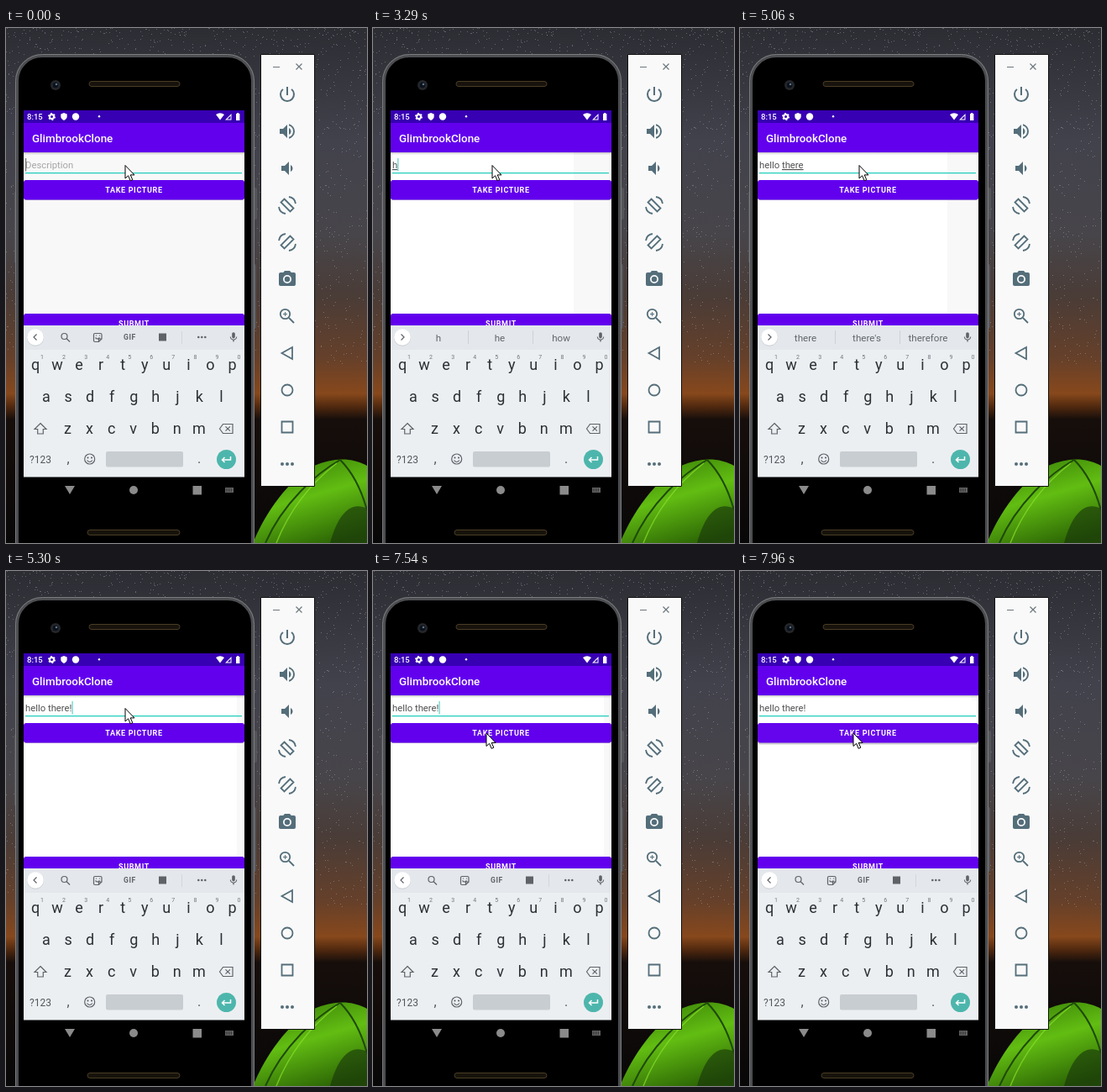
Recreate the animation shown at these times as an HTML page. Size 430 by 613 pixels, loop 8000 ms.

```html
<!DOCTYPE html>
<html lang="en">
<head>
<meta charset="utf-8">
<title>Emulator typing demo</title>
<style>
  html, body { margin: 0; width: 100%; height: 100%; overflow: hidden; background: #000; }
  svg { display: block; width: 430px; height: 613px; }
  text { font-family: Roboto, sans-serif; white-space: pre; }
  .mid { text-anchor: middle; }
  .line { fill: none; stroke: #5f6368; stroke-width: 1.2; }
  .tool { fill: #546e7a; }
  .tool .o { fill: none; stroke: #546e7a; stroke-width: 1.8; }
  .btn { font-size: 9px; font-weight: 700; letter-spacing: .65px; fill: #fff; text-anchor: middle; }
  .key { font-size: 18px; fill: #2b3034; text-anchor: middle; }
</style>
</head>
<body>
<svg viewBox="0 0 430 613">
  <defs>
    <linearGradient id="sky" x2="0" y2="1">
      <stop offset="0" stop-color="#2c2c33"/>
      <stop offset=".22" stop-color="#42424c"/>
      <stop offset=".4" stop-color="#47454a"/>
      <stop offset=".52" stop-color="#4a3c37"/>
      <stop offset=".64" stop-color="#65402a"/>
      <stop offset=".71" stop-color="#87481c"/>
      <stop offset=".735" stop-color="#51290f"/>
      <stop offset=".76" stop-color="#160e0b"/>
      <stop offset="1" stop-color="#080707"/>
    </linearGradient>
    <linearGradient id="tent" x1=".3" x2=".7" y2="1">
      <stop offset="0" stop-color="#3a8208"/>
      <stop offset=".45" stop-color="#62bd12"/>
      <stop offset="1" stop-color="#2c6505"/>
    </linearGradient>
    <linearGradient id="shade" x2="0" y2="1">
      <stop offset="0" stop-opacity=".22"/>
      <stop offset="1" stop-opacity="0"/>
    </linearGradient>
    <clipPath id="content"><path d="M21 148H284V354H21Z"/></clipPath>
  </defs>

  <!-- Backdrop -->
  <path fill="url(#sky)" d="M0 0H430V613H0Z"/>
  <path id="stars" stroke="#b9bbc6" stroke-opacity=".38" fill="none"/>
  <path fill="url(#tent)" d="M294 613C310 575 335 540 367 521C390 511 412 511 430 521V613Z"/>
  <path fill="#16330a" d="M430 572C410 562 395 580 386 613H430Z" opacity=".6"/>
  <path fill="none" stroke="#1e4a06" stroke-width="2" d="M398 514C370 530 330 565 309 613M398 514C414 530 424 552 430 574"/>
  <path fill="none" stroke="#8be22c" stroke-width="1.5" opacity=".7" d="M394 518C368 538 340 568 322 613"/>

  <!-- Phone -->
  <g fill="#55565a">
    <rect x="294" y="190" width="5" height="38" rx="2"/>
    <rect x="294" y="281" width="4" height="77" rx="2"/>
    <path d="M10 195h3v84h-3z"/>
  </g>
  <rect x="13" y="33" width="281" height="660" rx="30" stroke="#4c4d50" stroke-width="4"/>
  <rect x="11.5" y="31.5" width="284" height="660" rx="32" fill="none" stroke="#88898c" stroke-width=".8"/>
  <g fill="#17130c" stroke="#4a3d25">
    <rect x="99" y="63.500" width="108" height="6" rx="3"/>
    <rect x="97" y="597.500" width="110" height="6" rx="3"/>
  </g>
  <circle cx="59" cy="68" r="6" fill="#24262a"/>
  <circle cx="59" cy="68" r="3.200" fill="#0b111b"/>
  <circle cx="60" cy="67" r="1.300" fill="#5c7187"/>

  <!-- App content -->
  <path fill="#f8f8f8" d="M21 148H284V354H21Z"/>
  <path id="bright" fill="#fff"/>
  <path fill="#6200ee" d="M21 113H284V148H21Z"/>
  <path fill="#3700b3" d="M21 98H284V113H21Z"/>
  <path fill="url(#shade)" d="M21 148H284V151H21Z"/>
  <text x="31" y="136" font-size="13.400" font-weight="500" fill="#fff">GlimbrookClone</text>
  <g fill="#fff">
    <text x="25" y="109" font-size="9.500" font-weight="500">8:15</text>
    <circle cx="54.500" cy="105.500" r="2.500" fill="none" stroke="#fff" stroke-width="2"/>
    <circle cx="54.500" cy="105.500" r="3.800" fill="none" stroke="#fff" stroke-width="1.400" stroke-dasharray="1.990"/>
    <path d="M69 101l3.700 1.500v2.700q0 3-3.700 4.800q-3.700-1.800-3.700-4.800v-2.700z"/>
    <circle cx="83" cy="105.500" r="4.200"/>
    <circle cx="111" cy="105.300" r="1.200"/>
    <path d="M250 103q5-3.500 10 0l-5 6.500zM268.500 109.500v-7.500l-7.500 7.500zM274 102h1.200v-1h2v1h1.200v8h-4.400z"/>
    <path fill="#3700b3" d="M267.500 104.500v4h-4z"/>
  </g>

  <path fill="#21cdbd" d="M23 172H281V173.200H23Z"/>
  <text id="hint" x="23" y="167" font-size="11.300" fill="#a5a5a5">Description</text>
  <text x="23" y="167" font-size="11.300" fill="#505050"><tspan id="done"></tspan><tspan id="word" text-decoration="underline"></tspan></text>
  <path id="caret" stroke-width="1.200"/>

  <g clip-path="url(#content)">
    <rect id="shadow" x="21" y="182" width="263" height="24" rx="3" opacity=".2"/>
    <rect id="take" x="21" y="181" width="263" height="23.500" rx="3"/>
    <text class="btn" x="152.500" y="196.300">TAKE PICTURE</text>
    <rect x="21" y="340" width="263" height="24" rx="3" fill="#6200ee"/>
    <text class="btn" x="152.500" y="355">SUBMIT</text>
  </g>

  <!-- Keyboard -->
  <path fill="#eceff2" d="M21 354H284V534.500H21Z"/>
  <path fill="#e4e7eb" d="M21 354H284V383H21Z"/>
  <circle cx="35" cy="368.800" r="10" fill="#c9ccd0"/>
  <circle cx="35" cy="368" r="9.800" fill="#fff"/>
  <path id="chevron" class="line" stroke-width="1.500"/>
  <g id="tools">
    <g class="line">
      <circle cx="69.500" cy="367" r="3.500"/>
      <path d="M72 369.500l4 4"/>
      <path d="M106 363.500h6.500q1.500 0 1.500 1.500v5l-3.500 3.500h-4.500q-1.500 0-1.500-1.500v-7q0-1.500 1.500-1.500zM114 370h-3.500v3.500M106.500 368.500q2.500 3 5 0M107 366h1M111 366h1"/>
    </g>
    <text class="mid" x="147.500" y="371" font-size="8.600" font-weight="700" letter-spacing=".6" fill="#5f6368">GIF</text>
    <path fill="#5f6368" d="M182 363.500h9v9h-9z"/>
    <path stroke="#d3d6da" d="M209.500 361v15"/>
    <g fill="#5f6368"><circle cx="229.300" cy="368" r="1.300"/><circle cx="233.300" cy="368" r="1.300"/><circle cx="237.300" cy="368" r="1.300"/></g>
  </g>
  <g id="suggestions" class="mid" font-size="11.600" fill="#60666b">
    <path stroke="#cdd1d5" d="M113.500 360v16M190.500 360v16"/>
    <text x="78" y="372.500"></text><text x="151" y="372.500"></text><text x="224" y="372.500"></text>
  </g>
  <path fill="#5f6368" transform="translate(263.800 361) scale(.6)" d="M12 14c1.660 0 3-1.340 3-3V5c0-1.660-1.340-3-3-3S9 3.340 9 5v6c0 1.660 1.340 3 3 3zm5.300-3c0 3-2.540 5.100-5.300 5.100S6.700 14 6.700 11H5c0 3.410 2.720 6.230 6 6.720V21h2v-3.280c3.280-.48 6-3.300 6-6.720z"/>
  <g id="keys"></g>
  <path id="shift" class="line" d="M41 470.500l7 7h-3.700v5.500h-6.600v-5.500h-3.700z"/>
  <path class="line" d="M254.500 477l4-5.500h11.500v11h-11.500zM261.500 474.300l5.400 5.400M266.900 474.300l-5.400 5.400"/>
  <g fill="#50565b">
    <text class="mid" x="41" y="517.500" font-size="12">?123</text>
    <text class="mid" x="74" y="518" font-size="16">,</text>
    <text class="mid" x="230" y="518" font-size="16">.</text>
    <circle cx="97.500" cy="511.500" r="1"/><circle cx="102" cy="511.500" r="1"/>
  </g>
  <circle class="line" cx="99.700" cy="513" r="6"/>
  <path class="line" d="M96.500 514.500q3.200 4 6.400 0"/>
  <rect x="119" y="504" width="92" height="18.500" rx="2" fill="#c8cdd1"/>
  <circle cx="262.500" cy="513.500" r="11.500" fill="#4db6ac"/>
  <path d="M267.500 510v4h-10M260.500 511l-3 3l3 3" fill="none" stroke="#fff" stroke-width="1.500"/>

  <!-- Navigation bar -->
  <g fill="#8b8b8b">
    <path d="M70 545h12l-6 10z"/><circle cx="152" cy="550" r="5"/><path d="M222.500 545h10.500v10.500h-10.500z"/>
    <path fill="#626262" d="M261 547h10v6h-10z"/>
    <path stroke="#111" stroke-dasharray="1" d="M262 549h8M262 551h8"/>
  </g>

  <!-- Emulator panel -->
  <path fill="#f9f9f9" stroke="#111" d="M303.500 31.500H367.500V545.500H303.500Z"/>
  <path stroke="#6c777c" stroke-width="1.200" d="M318 46.500h8M345.500 42.500l7 7M352.500 42.500l-7 7"/>
  <g id="panel" class="tool"></g>

  <path id="pointer" fill="#fff" stroke="#000" stroke-linejoin="round" d="M0 0V15.500L3.600 12.300L6.200 18.300L8.800 17.200L6.200 11.400H11Z"/>
</svg>

<script>
const $ = id => document.getElementById(id);
const set = (id, attrs) => Object.entries(attrs).forEach(([k, v]) => $(id).setAttribute(k, v));

// Stars thin out towards the horizon.
let seed = 7;
const random = () => (seed = seed * 16807 % 2147483647) / 2147483647;
set('stars', { d: Array.from({ length: 1900 }, () =>
  `M${Math.floor(random() * 430)} ${Math.floor(random() ** 1.3 * 400) + .5}h1`).join('') });

// Letter rows: letters, first centre, baseline.
const rows = [['qwertyuiop', 35, 407], ['asdfghjkl', 48, 444.5], ['zxcvbnm', 73.5, 482.5]];
$('keys').innerHTML = rows.map(([letters, x0, y], row) => [...letters].map((c, i) => {
  const x = x0 + i * 26.05;
  const digit = `<text class="mid" x="${x + 8}" y="394" font-size="7" fill="#70767b">${(i + 1) % 10}</text>`;
  return `<text class="key" x="${x}" y="${y}">${c}</text>` + (row ? '' : digit);
}).join('')).join('');
const letterKeys = [...document.querySelectorAll('.key')];

const rotate = '<path class="o" d="M8.500 4.500L19.500 15.500L15.500 19.500L4.500 8.500ZM14 2Q21 3 22 10M10 22Q3 21 2 14"/>';
const icons = [
  '<path d="M13 3h-2v10h2zm4.830 2.170l-1.420 1.420A7 7 0 1 1 7.580 6.580L6.170 5.170a9 9 0 1 0 11.660 0z"/>',
  '<path d="M3 9v6h4l5 5V4L7 9zm13.500 3c0-1.770-1.020-3.290-2.500-4.030v8.050c1.480-.73 2.500-2.250 2.500-4.020zM14 3.230v2.060a7 7 0 0 1 0 13.420v2.060a9 9 0 0 0 0-17.540z"/>',
  '<path d="M18.500 12c0-1.770-1.020-3.290-2.500-4.030v8.050c1.480-.73 2.500-2.250 2.500-4.020zM5 9v6h4l5 5V4L9 9z"/>',
  rotate,
  `<g transform="matrix(-1 0 0 1 24 0)">${rotate}</g>`,
  '<path d="M9 2L7.170 4H4q-2 0-2 2v12q0 2 2 2h16q2 0 2-2V6q0-2-2-2h-3.170L15 2zm3 15a5 5 0 1 1 0-10a5 5 0 0 1 0 10z"/><circle cx="12" cy="12" r="3.200"/>',
  '<circle class="o" cx="9.500" cy="9.500" r="5.700"/><path class="o" d="M14 14l6 6"/><path d="M12 10h-2v2H9v-2H7V9h2V7h1v2h2z"/>',
  '<path class="o" d="M18 5V19L5.500 12Z"/>',
  '<circle class="o" cx="12" cy="12" r="6.500"/>',
  '<path class="o" d="M5.500 5.500h13v13h-13z"/>',
  '<circle cx="6" cy="12" r="2"/><circle cx="12" cy="12" r="2"/><circle cx="18" cy="12" r="2"/>'
];
$('panel').innerHTML = icons.map((icon, i) =>
  `<g transform="translate(323 ${67 + 44 * i})">${icon}</g>`).join('');

// Each step changes part of the state and holds until the next one.
const purple = '#6200ee';
const steps = [
  [0, { done: '', word: '', words: null, caret: 1, caps: 0, bright: 21, x: 142, y: 163.5, take: purple, wide: 0 }],
  [560, { caret: 0 }], [1120, { caret: 1 }], [1520, { caret: 0 }],
  [2050, { caret: 1 }], [2610, { caret: 0 }], [3010, { caret: 1 }],
  [3290, { word: 'h', words: ['h', 'he', 'how'], bright: 239 }],
  [3410, { word: 'he', words: ['he', 'her', 'hey'] }],
  [3530, { word: 'hell', words: ['hell', 'hello', "he'll"] }],
  [3650, { word: 'hello', words: ['hello', 'hellos', 'Hello'] }],
  [3770, { done: 'hello ', word: '', words: ['my', 'I', "I'm"] }],
  [4170, { word: 't', words: ['t', 'the', 'to'], bright: 247 }],
  [4290, { word: 'th', words: ['th', 'the', 'that'] }],
  [4410, { word: 'the', words: ['the', 'they', 'then'] }],
  [4530, { word: 'there', words: ['there', "there's", 'therefore'] }],
  [5060, { caret: 0 }],
  [5180, { caps: 1 }],
  [5300, { done: 'hello there!', word: '', words: null, caps: 0, caret: 1, bright: 275 }],
  [5800, { caret: 0 }],
  [6070, { x: 146, y: 200 }], [6200, { x: 148, y: 230, caret: 1 }],
  [6470, { x: 142, y: 215 }], [6630, { x: 139, y: 203 }],
  [6750, { x: 137, y: 196, caret: 0 }], [6890, { x: 136, y: 194 }],
  [7020, { x: 136, y: 192 }], [7270, { caret: 1 }],
  [7540, { x: 135, y: 193 }],
  [7690, { take: '#6f17f0', wide: 1 }],
  [7810, { take: '#6a0ef0', caret: 0 }], [7960, { take: '#6505ee' }]
];

function draw(time) {
  const state = Object.assign({}, ...steps.filter(([at]) => at <= time).map(([, change]) => change));
  const { done, word, words, caps, bright, wide } = state;
  const typed = done + word;
  $('done').textContent = done;
  $('word').textContent = word;
  set('hint', { visibility: typed ? 'hidden' : 'visible' });
  const caretX = 23.6 + (typed ? $('done').parentNode.getComputedTextLength() : 0);
  set('caret', { d: `M${caretX} 155V170.500`, stroke: typed ? '#5fcfc6' : '#777', opacity: state.caret });

  set('bright', { d: `M21 148H${bright}V340H21Z` + (wide ? 'M21 154H284V209H21Z' : '') });
  set('take', { fill: state.take });
  set('shadow', { height: wide ? 24.5 : 23 });

  set('tools', { visibility: words ? 'hidden' : 'visible' });
  set('suggestions', { visibility: words ? 'visible' : 'hidden' });
  if (words) $('suggestions').querySelectorAll('text').forEach((node, i) => node.textContent = words[i]);
  set('chevron', { d: words ? 'M33.500 364.500l3.500 3.500l-3.500 3.500' : 'M36.500 364.500l-3.500 3.500l3.500 3.500' });
  letterKeys.forEach(key => key.textContent = caps ? key.textContent.toUpperCase() : key.textContent.toLowerCase());
  $('shift').style.fill = caps ? '#5f6368' : 'none';
  set('pointer', { transform: `translate(${state.x} ${state.y})` });
}

function tick() {
  draw(performance.now() % 8000);
  requestAnimationFrame(tick);
}
tick();
</script>
</body>
</html>
```
